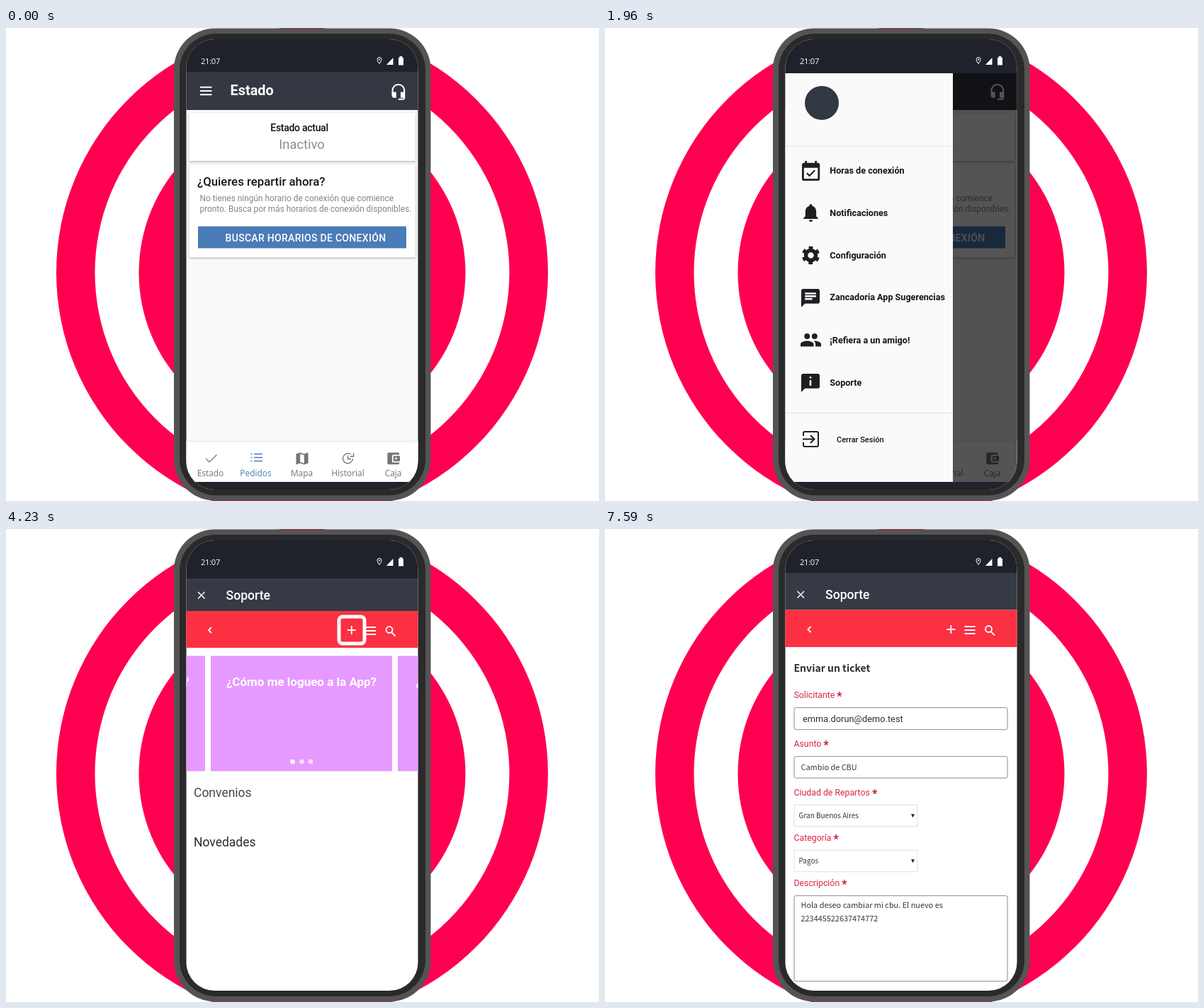
An HTML page for the animation above (8 s loop, 837 px wide and 669 px high).

```html
<!DOCTYPE html>
<html lang="es">
<head>
<meta charset="utf-8">
<style>
html, body { margin: 0; width: 100%; height: 100%; overflow: hidden; background: #fff; }
svg { display: block; width: 837px; height: 669px; }
text { font-family: Roboto, sans-serif; white-space: pre; }
.nav { font-family: "Open Sans", sans-serif; }
.src { font-family: "Noto Sans CJK SC", "Noto Sans CJK JP", "Noto Sans", sans-serif; }
.mid { text-anchor: middle; }
.end { text-anchor: end; }
.card { fill: #fff; filter: drop-shadow(0 1px 1.5px #0005); }
.line { fill: none; }
</style>
</head>
<body>
<svg id="stage" viewBox="0 0 837 669"></svg>
<script>
const LOOP = 8000;
const RED = '#fb3042', INK = '#1d1f22', GREY = '#757575', BLUE = '#4a7cb8';

const text = (x, y, size, str, fill = INK, weight = 400, cls = '', spacing = 0) =>
  `<text x="${x}" y="${y}" font-size="${size}" fill="${fill}" font-weight="${weight}" class="${cls}" letter-spacing="${spacing}">${str}</text>`;
const rect = (x, y, w, h, fill, extra = '') =>
  `<rect x="${x}" y="${y}" width="${w}" height="${h}" fill="${fill}" ${extra}/>`;
const line = (d, color, width = 2) =>
  `<path class="line" d="${d}" stroke="${color}" stroke-width="${width}"/>`;
const circle = (x, y, r, fill, extra = '') => `<circle cx="${x}" cy="${y}" r="${r}" fill="${fill}" ${extra}/>`;
const icon = (x, y, scale, d, fill = INK) =>
  `<path transform="translate(${x} ${y}) scale(${scale})" d="${d}" fill="${fill}" fill-rule="evenodd"/>`;
const outline = (x, y, w, h, color = RED) =>
  rect(x, y, w, h, 'none', `rx="5" stroke="${color}" stroke-width="5"`);

const BUBBLE = 'M20 2H4c-1.1 0-2 .9-2 2v18l4-4h14c1.1 0 2-.9 2-2V4c0-1.1-.9-2-2-2z';

const backdrop =
  circle(418, 346, 347, '#ff0050') + circle(418, 346, 292.5, '#fff') + circle(418, 346, 230.5, '#ff0050') +
  rect(237, .5, 362.5, 668, '#545454', 'rx="58"') +
  rect(245, 8, 347, 653, '#2a2a2a', 'rx="51"');

const statusBar =
  text(275, 51, 11.2, '21:07', '#fff', 400, 'nav', -.3) +
  line('M527 50.5q-3-4-3-6a3 3 0 0 1 6 0q0 2-3 6z', '#fff', 1) + circle(527, 44.5, 1, '#fff') +
  '<path fill="#fff" d="M537 52l9.5-10v10zM554 42h1.5v-2h4v2h1.5v10.500h-7z"/>';

const navItem = (x, label, color = GREY) => text(x, 633.5, 11.9, label, color, 400, 'nav mid');

const home = () =>
  rect(254, 16, 328, 637, '#f9f9f9') + rect(254, 16, 328, 46, '#1f222b') + rect(254, 62, 328, 54, '#343842') +
  line('M274 83.700h16.500M274 89h16.500M274 94.300h16.500', '#fff', 1.900) +
  text(316.5, 95, 19.9, 'Estado', '#fff', 700) +
  icon(541.4, 77.9, 1.04, 'M12 1c-4.97 0-9 4.030-9 9v7c0 1.660 1.340 3 3 3h3v-8H5v-2c0-3.870 3.130-7 7-7s7 3.130 7 7v2h-4v8h4v1h-7v2h6c1.660 0 3-1.340 3-3V10c0-4.970-4.030-9-9-9z', '#fff') +
  rect(258.5, 120, 319.5, 68, '#fff', 'class="card"') +
  text(414, 146, 14, 'Estado actual', '#111', 500, 'mid', -.3) +
  text(417.5, 170.5, 18.4, 'Inactivo', '#8c8c8c', 400, 'mid') +
  rect(258.5, 192.5, 319.5, 132, '#fff', 'class="card"') +
  text(270, 222.5, 16.8, '¿Quieres repartir ahora?', '#151515', 500) +
  text(273.5, 245, 11.9, 'No tienes ningún horario de conexión que comience', '#858585') +
  text(273.5, 259.5, 11.85, 'pronto. Busca por más horarios de conexión disponibles.', '#858585') +
  rect(271, 280.5, 294, 31, BLUE) +
  text(423, 301.5, 14, 'BUSCAR HORARIOS DE CONEXIÓN', '#fff', 500, 'mid', .3) +
  rect(254, 584, 328, 58, '#fff') + rect(254, 584, 328, 1, '#e6e6e6') +
  line('M282 609l5 5 10.500-10.500', GREY, 1.200) + navItem(288.5, 'Estado') +
  line('M350 602.500h12M350 607.500h12M350 612.500h12M345.500 602.500h2M345.500 607.500h2M345.500 612.500h2', BLUE, 1.300) + navItem(352.5, 'Pedidos', BLUE) +
  icon(406.6, 597.6, .95, 'M20.500 3L15 5.100 9 3 3.400 4.900Q3 5 3 5.400V20.500q0 .5.600.5L9 18.900l6 2.100 5.600-1.900q.4-.1.400-.5V3.500q0-.5-.5-.5zM15 19l-6-2.100V5l6 2.100z', GREY) + navItem(417.5, 'Mapa') +
  line('M489.500 609a7 7 0 1 1-3-6M490.500 601v5h-5M482.500 604.500v5h4.500', GREY, 1.300) + navItem(482.5, 'Historial') +
  icon(535.6, 597.8, .93, 'M21 18v1q0 2-2 2H5q-2 0-2-2V5q0-2 2-2h14q2 0 2 2v1h-9q-2 0-2 2v8q0 2 2 2zM12 16h10V8H12zM16 13.500a1.500 1.500 0 1 1 0-3 1.500 1.500 0 0 1 0 3z', GREY) + navItem(546.5, 'Caja') +
  rect(254, 642, 328, 11, '#20232b');

const menuItem = (y, label) => text(317.3, y, 12.6, label, '#151515', 600);

const drawer = () =>
  rect(491, 64, 91, 578, '#000', 'opacity=".67"') +
  rect(254, 62, 328, 2, '#1f222b') + rect(254, 64, 237, 578, '#fafafa') +
  circle(306, 106, 24, '#323841') +
  rect(254, 166.5, 237, 1, '#e2e2e2') + rect(254, 544, 237, 1, '#e2e2e2') +
  icon(273.8, 186.6, 1.4, 'M16.500 11l-1-1-4.900 4.900-2.100-2.100-1.100 1 3.200 3.200zM19 3h-1V1h-2v2H8V1H6v2H5Q3 3 3 5v14q0 2 2 2h14q2 0 2-2V5q0-2-2-2zM19 19H5V8h14z') +
  menuItem(205.5, 'Horas de conexión') +
  icon(275.1, 245.8, 1.28, 'M12 22q2 0 2-2h-4q0 2 2 2zM18 16v-5c0-3.100-1.600-5.600-4.500-6.300V4a1.500 1.500 0 0 0-3 0v.7C7.600 5.400 6 7.900 6 11v5l-2 2v1h16v-1z') +
  menuItem(265.5, 'Notificaciones') +
  circle(290.5, 321.5, 7, 'none', `stroke="${INK}" stroke-width="5.500"`) +
  circle(290.5, 321.5, 10.5, 'none', `stroke="${INK}" stroke-width="4.500" stroke-dasharray="5.500" transform="rotate(-105 290.500 321.500)"`) +
  menuItem(325.5, 'Configuración') +
  icon(274.4, 366.4, 1.3, BUBBLE + 'M6 6h12v2H6zM6 9h12v2H6zM6 12h8v2H6z') +
  menuItem(385, 'Zancadoria App Sugerencias') +
  icon(274.7, 425.4, 1.32, 'M16 11a3 3 0 1 0 0-6 3 3 0 0 0 0 6zM8 11a3 3 0 1 0 0-6 3 3 0 0 0 0 6zM8 13c-2.300 0-7 1.200-7 3.500V19h14v-2.500C15 14.200 10.300 13 8 13zM16 13h-1c1.200.9 2 2 2 3.500V19h6v-2.500c0-2.300-4.700-3.500-7-3.500z') +
  menuItem(445.5, '¡Refiera a un amigo!') +
  icon(274.4, 486.4, 1.3, BUBBLE + 'M11 5h2v2h-2zM11 9h2v6h-2z') +
  menuItem(505.5, 'Soporte') +
  line('M280 577v-4q0-2 2-2h17q2 0 2 2v17q0 2-2 2h-17q-2 0-2-2v-4M279 581.500h16M290 576l5.500 5.500-5.500 5.500', INK, 2) +
  text(327, 585.5, 11, 'Cerrar Sesión', '#151515', 500);

// Title bar and red toolbar; every edge is a y position.
const supportTop = (top, toolbar, bottom, titleY, iconY, dx) =>
  rect(254, 16, 328, 637, '#fff') + rect(254, 16, 328, top - 16, '#1f222b') +
  rect(254, top, 328, toolbar - top, '#363a44') + rect(254, toolbar, 328, bottom - toolbar, RED) +
  `<g transform="translate(${dx} ${titleY})">` + line('M271-11l9.500 9.500M280.500-11l-9.500 9.500', '#fff', 1.500) +
  text(310.5, 0, 17.6, 'Soporte', '#fff', 500) + '</g>' +
  `<g transform="translate(${dx} ${iconY})">` +
  line('M290-4l-4 4 4 4M481.800 0h12M487.800-6v12M507-4h15M507 1h15M507 6h15M544.500 3.500l5 5', '#fff', 1.800) +
  circle(541, -.5, 4.5, 'none', 'stroke="#fff" stroke-width="1.800"') + '</g>';

const support = () =>
  supportTop(70, 116, 168, 100, 143, 0) +
  [[254, 27], [289, 256], [553, 29]].map(([x, w]) => rect(x, 179.5, w, 163, '#e699ff')).join('') +
  text(417, 222, 17, '¿Cómo me logueo a la App?', '#fff', 700, 'mid') +
  text(259, 222, 17, '?', '#ffffffb0', 700, 'end') + text(578.5, 222, 17, '¿', '#fff', 700) +
  circle(404.5, 329, 3.3, '#fff') + circle(417.5, 329, 3.3, '#ffffffb8') + circle(430, 329, 3.3, '#ffffffb8') +
  text(265, 378.5, 17.5, 'Convenios', '#45474a') + text(265, 448.5, 17.5, 'Novedades', '#2a2c2f');

const label = (y, str) =>
  `<text x="267" y="${y}" font-size="12.3" fill="#d92743">${str} <tspan font-size="16" font-weight="700" fill="#c4122f" dy="3">*</tspan></text>`;
const field = (y, h) => rect(267.5, y, 301, h, '#fff', 'rx="2.5" stroke="#8a8a8a"');
const select = (y, value, size) =>
  rect(267.5, y, 174, 30.5, '#fff', 'stroke="#dcdfe3"') +
  text(274, y + 19, size, value, '#33363c', 400, 'src') +
  `<path d="M432.500 ${y + 13}h5l-2.500 5z" fill="#222"/>`;

const form = (filled) =>
  (filled ? supportTop(62, 114.5, 167, 99, 142, .5) : supportTop(70, 113.5, 166.500, 98, 141, 1)) +
  `<g transform="translate(${filled ? '-.5 1.7' : '0 0'})">` +
  text(267, 200, 14, 'Enviar un ticket', '#2b2e34', 700, 'src') +
  label(237, 'Solicitante') + field(251, 31) +
  text(279.5, 271, filled ? 12.8 : 14, 'emma.dorun@demo.test', '#303236') +
  label(306, 'Asunto') + field(320, 30.5) +
  label(375, 'Ciudad de Repartos') + select(388.5, filled ? 'Gran Buenos Aires' : '...', 10) +
  label(439, 'Categoría') + select(452.5, filled ? 'Pagos' : '...', 10) +
  label(503, 'Descripción') + field(517, 121) +
  (filled
    ? text(277, 339, 10.9, 'Cambio de CBU', '#33363c', 400, 'src') +
      text(277, 534, 10.9, 'Hola deseo cambiar mi cbu. El nuevo es', '#33363c', 400, 'src') +
      text(277, 553, 10.9, '223445522637474772', '#33363c', 400, 'src')
    : '') + '</g>';

// Each layer: markup, start and end in ms.
const layers = [
  [home(), 0, 3930],
  [outline(265.5, 70.5, 35, 37), 630, 1960],
  [drawer(), 1960, 3930],
  [outline(266.5, 468.5, 190.5, 62.5), 2360, 3930],
  [support(), 3930, 5760],
  [outline(470, 124, 36, 38, '#fff'), 4230, 5760],
  [form(false), 5760, 7590],
  [form(true), 7590, LOOP],
];

const stage = document.getElementById('stage');
stage.innerHTML =
  '<clipPath id="screen"><rect x="254.5" y="16" width="327" height="637" rx="40"/></clipPath>' + backdrop +
  '<g clip-path="url(#screen)">' + layers.map(([markup]) => `<g class="layer">${markup}</g>`).join('') + statusBar + '</g>';
const groups = stage.querySelectorAll('.layer');

const start = performance.now();
function draw(now) {
  const t = Math.max(0, now - start) % LOOP;
  layers.forEach(([, from, to], i) => {
    groups[i].style.display = t >= from && t < to ? '' : 'none';
  });
  requestAnimationFrame(draw);
}
draw(start);
</script>
</body>
</html>
```
